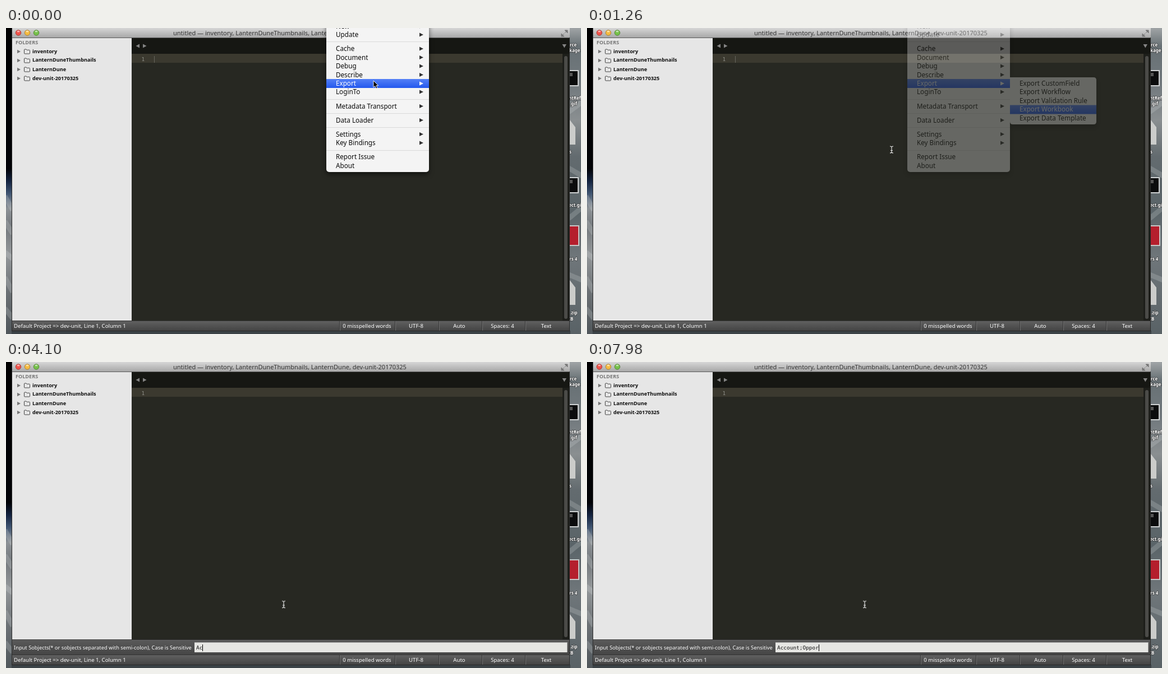
Animation of 1025x546 px, one loop 8000 ms. Source, as an HTML page:

```html
<!DOCTYPE html>
<html lang="en">
<head>
<meta charset="utf-8">
<title>Editor export menu</title>
<style>
html, body { margin: 0; width: 100%; height: 100%; overflow: hidden; background: #555c60; }
svg { position: absolute; left: 0; top: 0; }
text { font-family: "Noto Sans", "Open Sans", sans-serif; white-space: pre; }
.title { font-size: 11px; fill: #333; }
.side { font-size: 9.1px; font-weight: 700; fill: #0c0c0c; }
.bar { font-size: 9.6px; font-weight: 500; fill: #fff; }
.ask { font-size: 9.3px; }
.mid { text-anchor: middle; }
.menu text { font-size: 11.7px; fill: #0a0a0a; }
.menu .on text { fill: #fff; }
.desk text { font-size: 8px; font-weight: 600; fill: #fff; paint-order: stroke; stroke: #222a; stroke-width: 1.5px; }

/* every change is a hard step in one 8 s loop */
.anim { animation: 8s step-end infinite; }
.menu { animation-name: menu; filter: drop-shadow(0 4px 4px #0008); }
.sub { animation-name: sub; }
.pick1 { animation-name: pick1; }
.pick2 { animation-name: pick2; }
.pick3 { animation-name: pick3; }
.pick4 { animation-name: pick4; }
.arrow { animation-name: arrow; }
.beam { animation-name: beam; }
.before { animation-name: before; }
.after { animation-name: after; }
.line { position: absolute; left: 339px; top: 504px; height: 12px; display: flex;
  font: 9.45px/12px "DejaVu Sans Mono", monospace; color: #111; }
.line span { overflow: hidden; white-space: pre; flex: none; }
.star { position: relative; top: 2.5px; animation-name: star; }
.typed { animation-name: typed; }
.caret { width: 1px; height: 12px; background: #000; animation-name: caret; }

@keyframes menu { 0% { opacity: 1 } 15.75% { opacity: .31 } 17.625%, 100% { opacity: 0 } }
@keyframes sub { 0% { visibility: hidden } 1.875%, 100% { visibility: visible } }
@keyframes pick1 { 0% { opacity: 0 } 3.75% { opacity: 1 } 5.625%, 100% { opacity: 0 } }
@keyframes pick2 { 0% { opacity: 0 } 5.625% { opacity: 1 } 8.25%, 100% { opacity: 0 } }
@keyframes pick3 { 0% { opacity: 0 } 8.25% { opacity: 1 } 10.125%, 100% { opacity: 0 } }
@keyframes pick4 { 0% { opacity: 0 } 10.125% { opacity: 1 } 13.875% { opacity: 0 } 15.75%, 100% { opacity: 1 } }
@keyframes arrow {
  0% { transform: translate(655px, 94px); opacity: 1 }
  1.875% { transform: translate(692px, 95px); opacity: 1 }
  3.75% { transform: translate(772px, 98px); opacity: 1 }
  5.625% { transform: translate(838px, 113px); opacity: 1 }
  8.25% { transform: translate(860px, 138px); opacity: 1 }
  10.125% { transform: translate(859px, 143px); opacity: 1 }
  15.75%, 100% { transform: translate(859px, 143px); opacity: 0 }
}
@keyframes beam {
  0% { transform: translate(543px, 217px); opacity: 0 }
  15.75% { transform: translate(543px, 217px); opacity: 1 }
  17.625% { transform: translate(506.5px, 207.5px); opacity: 1 }
  19.5% { transform: translate(501px, 262px); opacity: 1 }
  21.375% { transform: translate(496px, 375px); opacity: 1 }
  23.5%, 100% { transform: translate(495px, 432.5px); opacity: 1 }
}
@keyframes before { 0% { visibility: visible } 17.625%, 100% { visibility: hidden } }
@keyframes after { 0% { visibility: hidden } 17.625%, 100% { visibility: visible } }
@keyframes star { 0% { width: 1ch } 38.375%, 100% { width: 0 } }
@keyframes typed {
  0% { width: 0 } 45.75% { width: 1ch } 51.25% { width: 2ch } 55% { width: 3ch }
  56.875% { width: 4ch } 58.75% { width: 5ch } 60.625% { width: 6ch } 62.375% { width: 7ch }
  81.125% { width: 8ch } 92.25% { width: 9ch } 96% { width: 10ch } 97.875% { width: 12ch }
  99.75%, 100% { width: 13ch }
}
@keyframes caret {
  0% { opacity: 1 } 29.125% { opacity: .5 } 31% { opacity: 0 } 34.75% { opacity: .2 } 36.5% { opacity: 1 }
  42% { opacity: .5 } 43.875% { opacity: 0 } 45.75% { opacity: 1 }
  68% { opacity: .5 } 69.875% { opacity: 0 } 75.5% { opacity: .5 } 77.375% { opacity: 1 }
  86.75% { opacity: 0 } 92.25%, 100% { opacity: 1 }
}
</style>
</head>
<body>
<svg width="1025" height="546" viewBox="0 0 1025 546">
  <defs>
    <linearGradient id="space" x2="0" y2="1">
      <stop offset="0" stop-color="#000"/><stop offset=".46" stop-color="#020306"/>
      <stop offset=".5" stop-color="#14233f"/><stop offset=".54" stop-color="#3f5470"/>
      <stop offset=".59" stop-color="#8d9296"/><stop offset=".65" stop-color="#74797d"/>
      <stop offset=".74" stop-color="#94989a"/><stop offset=".86" stop-color="#6d7276"/>
      <stop offset="1" stop-color="#50575b"/>
    </linearGradient>
    <linearGradient id="cloud" x2="0" y2="1">
      <stop offset="0" stop-color="#a0a4a6"/><stop offset=".06" stop-color="#677074"/>
      <stop offset=".2" stop-color="#757c80"/><stop offset=".3" stop-color="#8a8f91"/>
      <stop offset=".42" stop-color="#636b6f"/><stop offset=".6" stop-color="#5a6468"/>
      <stop offset=".75" stop-color="#6f767a"/><stop offset="1" stop-color="#596266"/>
    </linearGradient>
    <linearGradient id="chrome" x2="0" y2="1"><stop stop-color="#d6d6d6"/><stop offset="1" stop-color="#a8a8a8"/></linearGradient>
    <linearGradient id="status" x2="0" y2="1"><stop stop-color="#626262"/><stop offset="1" stop-color="#444"/></linearGradient>
    <linearGradient id="panel" x2="0" y2="1"><stop stop-color="#5a5a5a"/><stop offset="1" stop-color="#464646"/></linearGradient>
    <linearGradient id="blue" x2="0" y2="1"><stop stop-color="#5480f6"/><stop offset="1" stop-color="#2358ee"/></linearGradient>
    <path id="tri" d="M0-3.6 7 0 0 3.6z"/>
    <g id="folder">
      <path d="M20-3.3 26 0 20 3.3z" transform="translate(0 .5)" fill="#777"/>
      <path d="M32.5 3.500v-6q0-1 1-1h2.500l1.200 1.300h4.300q1 0 1 1v4.700q0 1-1 1h-8q-1 0-1-1z" fill="none" stroke="#444"/>
    </g>
    <g id="screen">
      <rect x="1000" width="21" height="29" fill="#cfd2d3"/>
      <rect x="1000" y="2" width="19" height="25" fill="#0b0c0d"/>
      <path d="M1005 5h5v6h-5z" fill="#555"/>
    </g>
    <path id="page" d="M1000 0h5l10 13v31h-15z" fill="#cbccca"/>
  </defs>

  <!-- desktop -->
  <g class="desk">
    <rect width="1025" height="546" fill="#41484c"/>
    <rect width="14" height="546" fill="url(#space)"/>
    <rect x="1004" width="21" height="546" fill="url(#cloud)"/>
    <path d="M-2 300 12 325M-2 345l14 22M-2 400l14 12M-2 445l14 26M-2 500l14 18M1003 150l24-18M1003 250l24 14M1003 340l24-20M1003 440l24 10" stroke="#d5dadc" stroke-opacity=".22" stroke-width="9"/>
    <rect x="10" y="540" width="996" height="6" fill="#3b4246"/>
    <text x="1005" y="33">rce</text><text x="1004" y="43">kage</text>
    <use href="#screen" y="75"/>
    <text x="1003" y="128">ntRef</text><text x="1005" y="138">.gif</text>
    <use href="#page" y="164"/>
    <text x="1004" y="224">s</text>
    <use href="#screen" y="266"/>
    <text x="1003" y="319">ect.gif</text>
    <rect x="1000" y="352" width="22" height="37" fill="#c9c6c6"/>
    <rect x="1000" y="354" width="20" height="33" fill="#b51f2d"/>
    <text x="1004" y="415">rs 4</text>
    <use href="#page" y="450"/>
    <text x="1005" y="511">.zip</text><text x="1003" y="522">IB</text>
  </g>

  <!-- window -->
  <rect x="10" width="995" height="541" fill="#2a2a2a"/>
  <rect x="11" width="994" height="17" fill="url(#chrome)"/>
  <g stroke-width=".8">
    <circle cx="22" cy="8.500" r="4.800" fill="#f0524a" stroke="#9c3029"/>
    <circle cx="38" cy="8.500" r="4.800" fill="#f5bb40" stroke="#a0752a"/>
    <circle cx="54" cy="8.500" r="4.800" fill="#76c04a" stroke="#477d2a"/>
  </g>
  <g fill="#fff" opacity=".55">
    <ellipse cx="22" cy="6" rx="2.500" ry="1.500"/><ellipse cx="38" cy="6" rx="2.500" ry="1.500"/><ellipse cx="54" cy="6" rx="2.500" ry="1.500"/>
  </g>
  <path d="M996 4h5v5zM990 10v5h5zM999 6l-3 3M992 13l3-3" fill="#777" stroke="#777"/>
  <text class="title" x="298" y="13">untitled — inventory, LanternDuneThumbnails, LanternDune, dev-unit-20170325</text>

  <rect x="11" y="17" width="213" height="506" fill="#e6e6e6"/>
  <text class="side" x="17" y="29" style="fill:#777">FOLDERS</text>
  <use href="#folder" y="41.500"/><text class="side" x="47" y="45">inventory</text>
  <use href="#folder" y="57.500"/><text class="side" x="47" y="60">LanternDuneThumbnails</text>
  <use href="#folder" y="73.500"/><text class="side" x="47" y="77">LanternDune</text>
  <use href="#folder" y="89.500"/><text class="side" x="47" y="93">dev-unit-20170325</text>

  <rect x="224" y="17" width="780" height="506" fill="#272822"/>
  <rect x="224" y="17" width="780" height="29" fill="#161713"/>
  <path d="M11 17.500h993" stroke="#5a5a5a"/>
  <path d="M238 28.500v7l-6.500-3.500zM244 28.500v7l6.500-3.500zM991.500 29h7.500l-3.700 6.500z" fill="#858585"/>
  <rect x="224" y="46" width="768" height="16" fill="#3b392f"/>
  <text x="241.500" y="59" fill="#8f908a" style="font:9.45px 'DejaVu Sans Mono',monospace">1</text>
  <rect class="anim before" x="264" y="50" width="1" height="12" fill="#66665f"/>
  <rect x="992" y="46" width="12" height="477" fill="#1d1e1a"/>
  <rect x="995" y="50" width="6" height="469" rx="3" fill="#4b4b48"/>

  <rect x="11" y="522" width="993" height="18" fill="url(#status)"/>
  <path d="M11 522.500h993" stroke="#333"/>
  <path d="M594.500 523v17M693.500 523v17M771.500 523v17M848.500 523v17M925.500 523v17" stroke="#383838"/>
  <path d="M595.500 523v17M694.500 523v17M772.500 523v17M849.500 523v17M926.500 523v17" stroke="#707070"/>
  <text class="bar" x="14" y="535">Default Project =&gt; dev-unit, Line 1, Column 1</text>
  <g class="bar mid">
    <text x="643.500" y="535">0 misspelled words</text><text x="731" y="535">UTF-8</text>
    <text x="808" y="535">Auto</text><text x="885" y="535">Spaces: 4</text><text x="963" y="535">Text</text>
  </g>

  <!-- input panel -->
  <g class="anim after">
    <rect x="992" y="480" width="12" height="15" fill="#1d1e1a"/>
    <rect x="995" y="470" width="6" height="21" rx="3" fill="#4b4b48"/>
    <rect x="11" y="495" width="993" height="27" fill="url(#panel)"/>
    <path d="M11 495.500h993" stroke="#303030"/><path d="M11 496.500h993" stroke="#666"/>
    <rect x="336" y="500" width="664.500" height="18" fill="#e6e6e3"/>
    <path d="M336 500.500h664" stroke="#aaa"/>
    <text class="bar ask" x="14" y="512.500">Input Sobjects(* or sobjects separated with semi-colon), Case is Sensitive</text>
  </g>

  <!-- menus -->
  <g class="anim menu">
    <rect x="571" y="-20" width="183" height="277" rx="5" fill="#f4f4f4"/>
    <path d="M571 24.500h183M571 127.500h183M571 152.500h183M571 177.500h183M571 218.500h183" stroke="#dadada"/>
    <text x="588" y="1">New</text><text x="588" y="16">Update</text>
    <text x="588" y="41">Cache</text><text x="588" y="56.500">Document</text>
    <text x="588" y="72">Debug</text><text x="588" y="87.500">Describe</text>
    <g class="on"><rect x="571" y="91" width="183" height="16" fill="url(#blue)"/><text x="588" y="103">Export</text></g>
    <text x="588" y="118">LoginTo</text><text x="588" y="143.500">Metadata Transport</text>
    <text x="588" y="168.500">Data Loader</text><text x="588" y="193.500">Settings</text>
    <text x="588" y="209">Key Bindings</text><text x="588" y="234">Report Issue</text><text x="588" y="249.500">About</text>
    <g fill="#333">
      <use href="#tri" x="737" y="-3"/><use href="#tri" x="737" y="12"/><use href="#tri" x="737" y="37"/>
      <use href="#tri" x="737" y="52.500"/><use href="#tri" x="737" y="68"/><use href="#tri" x="737" y="83.500"/>
      <use href="#tri" x="737" y="99" fill="#fff"/><use href="#tri" x="737" y="114"/><use href="#tri" x="737" y="139.500"/>
      <use href="#tri" x="737" y="164.500"/><use href="#tri" x="737" y="189.500"/><use href="#tri" x="737" y="205"/>
    </g>
    <g class="anim sub">
      <path d="M754 88h149q5 0 5 5v74q0 5-5 5h-144q-5 0-5-5z" fill="#f4f4f4"/>
      <text x="771" y="103">Export CustomField</text><text x="771" y="118">Export Workflow</text>
      <text x="771" y="133.500">Export Validation Rule</text><text x="771" y="149">Export Workbook</text>
      <text x="771" y="164.500">Export Data Template</text>
      <g class="anim on pick1"><rect x="754" y="91" width="154" height="16" fill="url(#blue)"/><text x="771" y="103">Export CustomField</text></g>
      <g class="anim on pick2"><rect x="754" y="106.500" width="154" height="16" fill="url(#blue)"/><text x="771" y="118">Export Workflow</text></g>
      <g class="anim on pick3"><rect x="754" y="122" width="154" height="16" fill="url(#blue)"/><text x="771" y="133.500">Export Validation Rule</text></g>
      <g class="anim on pick4"><rect x="754" y="137.500" width="154" height="16" fill="url(#blue)"/><text x="771" y="149">Export Workbook</text></g>
    </g>
  </g>

  <!-- pointers -->
  <path class="anim arrow" d="M0 0v12l2.800-2.500 2 4.600 2.200-1-2-4.400h3.800z" fill="#000" stroke="#fff" stroke-width=".9"/>
  <path class="anim beam" d="M-3-6q3 0 3 2v8q0 2-3 2M3-6q-3 0-3 2M3 6q-3 0-3-2M-2 1.500h4" fill="none" stroke="#ececec" stroke-width="1.100"/>
</svg>
<div class="line anim after"><span class="anim star">*</span><span class="anim typed">Account;Oppor</span><span class="anim caret"></span></div>
</body>
</html>
```
